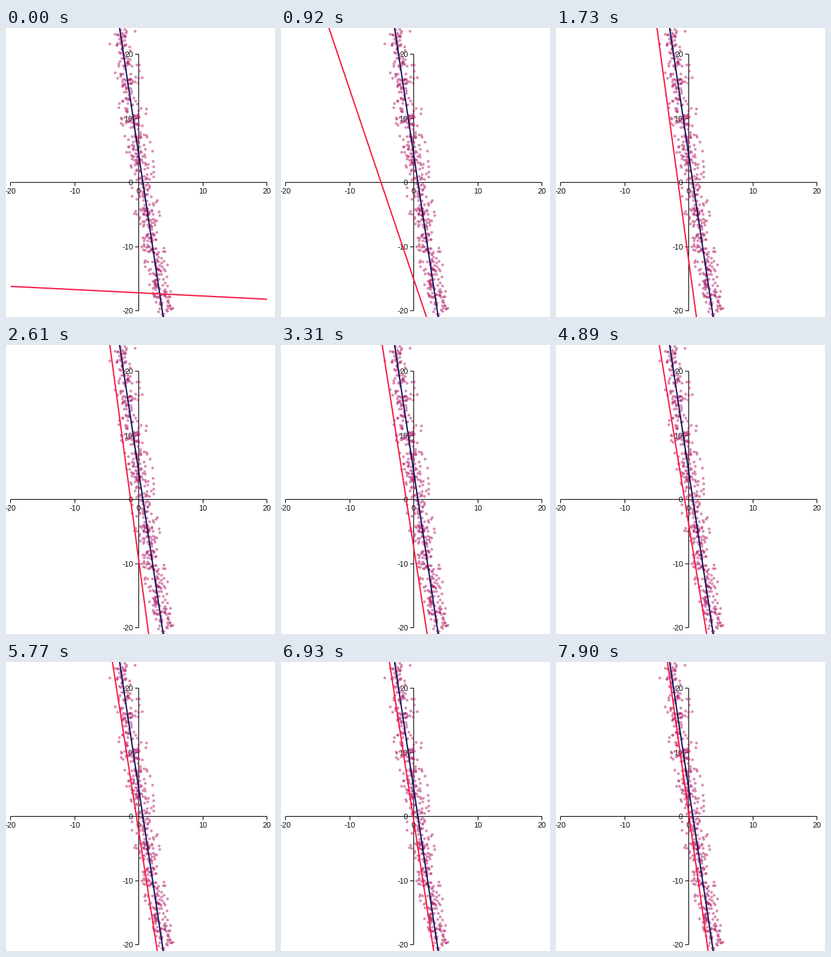
A matplotlib script for the animation above (7.99 s loop, 447x480 px).

```python
import numpy as np
import matplotlib.pyplot as plt
from matplotlib.animation import FuncAnimation

W, H, DPI = 447, 480, 72
X0, Y0, UNIT = 220.75, 256.5, 10.65
LOOP, TICK = 7990, 34
HOLD, STEP_MS, LAST = 490, 88.1, 85
TRUE_SLOPE, TRUE_BIAS = -6.62, 4.19

rng = np.random.default_rng(7)
plt.rcParams.update({"font.family": "Liberation Sans",
                     "text.hinting": "native", "text.hinting_factor": 1})


def px(x):
    return X0 + np.asarray(x) * UNIT


def py(y):
    return Y0 - np.asarray(y) * UNIT


def crisp(v):
    return np.floor(v) + 0.5


def ends(slope, bias):
    x = np.array([-20, 20])
    return px(x), py(slope * x + bias)


def make_dots():
    """Points scattered about the true line, denser in a few bands."""
    bands = rng.choice([155, 215, 305, 432], 70)
    y = np.concatenate([rng.uniform(-5, 485, 440), rng.normal(bands, 14)])
    x = px(((Y0 - y) / UNIT - TRUE_BIAS) / TRUE_SLOPE)
    return x + np.clip(rng.normal(0, 9.5, y.size), -22, 28), y


def make_fit():
    """Slope and bias per training step: decaying bias, swinging slope."""
    k = np.arange(LAST + 1)
    bias = TRUE_BIAS - 21.4 * np.exp(-0.0165 * k - 0.000044 * k ** 2)
    keys = [0, 15, 25, 40, 61, 74, LAST]
    slope = np.interp(k, keys, [-0.05, -7.33, -7.44, -6.62, -6.44, -6.53, -7.11])
    # Between key steps the slope swings shallower, with some noise.
    phase = np.interp(k, keys, range(len(keys))) % 1
    swing = np.sin(np.pi * phase) * (k > keys[1])
    return slope + swing * rng.normal(0.9, 0.4, k.size), bias


def draw_axes(ax):
    label = dict(fontsize=12, color="black", zorder=1, va="baseline")

    def line(x, y):
        ax.plot(x, y, color="black", lw=1.2, snap=False, zorder=1,
                solid_capstyle="butt")

    cx, cy = crisp(X0), crisp(Y0)
    line(px([-20, 20]), [cy, cy])
    line([cx, cx], py([-20, 20]))
    for v in range(-20, 21, 10):
        x, y = crisp(px(v)), crisp(py(v))
        line([x, x], [cy, cy + 6])
        line([cx - 6, cx], [y, y])
        ax.text(x, 275, str(v), ha="center", **label)
        ax.text(211, y + 4, str(v), ha="right", **label)


fig = plt.figure(figsize=((W + 0.01) / DPI, (H + 0.01) / DPI), dpi=DPI,
                 facecolor="white")
ax = fig.add_axes([0, 0, 1, 1])
ax.set_xlim(0, W)
ax.set_ylim(H, 0)
ax.axis("off")

draw_axes(ax)
slopes, biases = make_fit()
ax.scatter(*make_dots(), s=4.6 ** 2, color="#b01e68", alpha=0.5,
           linewidths=0, zorder=2)
ax.plot(*ends(TRUE_SLOPE, TRUE_BIAS), color="#14145a", lw=2.2, zorder=3)
guess, = ax.plot([], [], color="#fa1a44", lw=2.2, zorder=4,
                 solid_capstyle="butt")


def update(i):
    t = (i + 1) * TICK
    step = 0 if t < HOLD else min(LAST, 1 + int((t - HOLD) / STEP_MS))
    guess.set_data(*ends(slopes[step], biases[step]))
    return guess,


anim = FuncAnimation(fig, update, frames=LOOP // TICK, interval=TICK,
                     init_func=lambda: update(0), repeat=True, repeat_delay=0)
plt.show()
```
